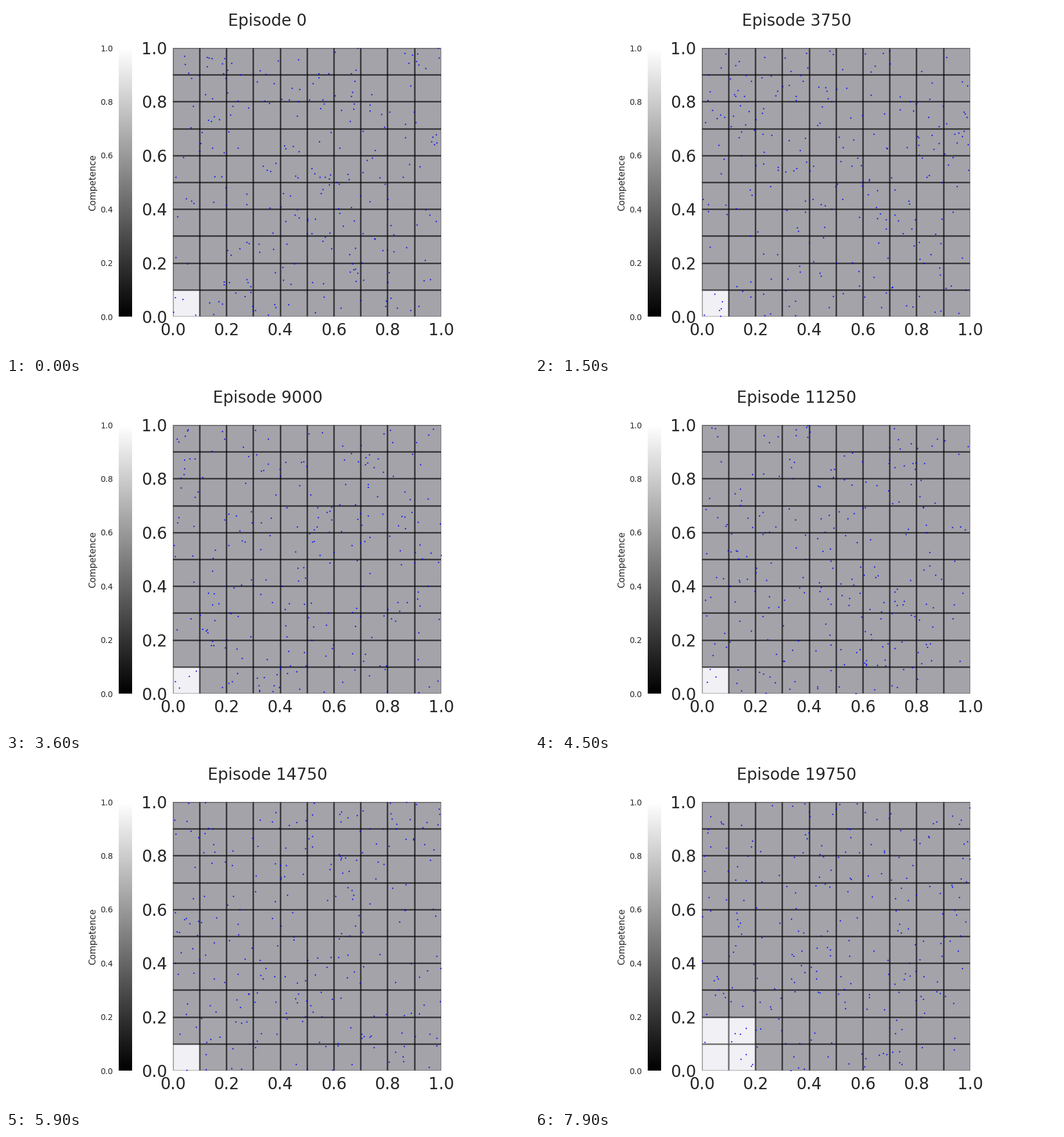
Recreate the animation shown at these times as a matplotlib script. Size 900 by 600 pixels, loop 8 s.

```python
import numpy as np
import matplotlib.pyplot as plt
from matplotlib.animation import FuncAnimation
from matplotlib.cm import ScalarMappable
from matplotlib.colors import Normalize

FRAMES = 80
INTERVAL = 100
EPISODES_PER_FRAME = 250
CELLS = 10
INK = "0.15"

plt.rcParams.update({
    "font.family": "DejaVu Sans",
    "text.color": INK,
    "axes.labelcolor": INK,
    "xtick.color": INK,
    "ytick.color": INK,
    "axes.facecolor": "#EAEAF2",
    "axes.linewidth": 0,
})


def competence(frame):
    """Mastery per cell, spreading outwards from the lower left corner."""
    ring = np.maximum(*np.indices((CELLS, CELLS)))
    near = np.interp(frame, [54, 59, 67, 71, 76], [0, 0.03, 0.07, 0.3, 1])
    far = np.interp(frame, [60, 79], [0, 0.03])
    return np.select([ring == 0, ring == 1, ring == 2], [1, near, far], 0.0)


def goals(frame):
    return np.random.default_rng(1000 + frame).random((2, EPISODES_PER_FRAME))


fig, ax = plt.subplots(figsize=(9, 6), dpi=100, facecolor="white")
ax.set(xlim=(0, 1), ylim=(0, 1), aspect="equal")
ax.tick_params(length=0, pad=7, labelsize=20)

edges = np.linspace(0, 1, CELLS + 1)
mesh = ax.pcolormesh(edges, edges, competence(0), cmap="gray", vmin=0, vmax=1,
                     alpha=0.3, edgecolors="black", linewidth=2)
ax.set(xlim=(0, 1), ylim=(0, 1))
dots, = ax.plot([], [], "o", color="blue", markersize=1.6,
                markeredgewidth=0, zorder=3)

bar = fig.colorbar(ScalarMappable(Normalize(0, 1), "gray"), ax=ax,
                   location="left", ticks=np.linspace(0, 1, 6))
bar.outline.set_visible(False)
bar.ax.tick_params(length=0, pad=7, labelsize=10)
bar.set_label("Competence", fontsize=11)
title = fig.suptitle("", fontsize=20)


def update(frame):
    title.set_text(f"Episode {frame * EPISODES_PER_FRAME}")
    mesh.set_array(competence(frame))
    dots.set_data(*goals(frame))
    return title, mesh, dots


anim = FuncAnimation(fig, update, frames=FRAMES, interval=INTERVAL,
                     repeat=True, repeat_delay=0)
plt.show()
```
